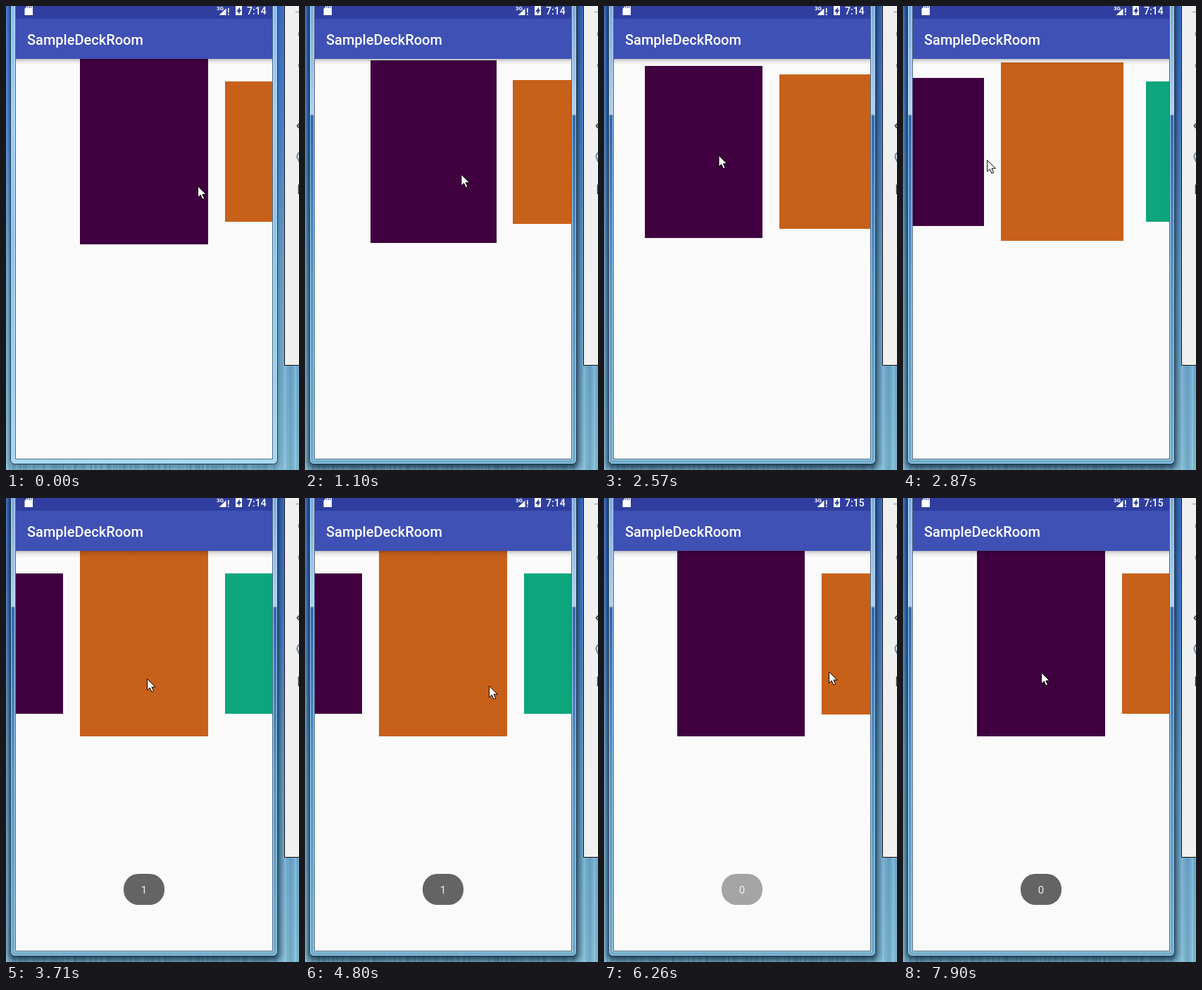
Recreate the animation shown at these times as an HTML page. Size 416 px wide and 658 px high, loop 8000 ms.

```html
<!DOCTYPE html>
<html lang="en">
<head>
<meta charset="utf-8">
<title>Card pager</title>
<style>
  html, body { margin: 0; width: 100%; height: 100%; overflow: hidden; }
  svg { display: block; width: 416px; height: 658px; }
  text { font-family: Roboto, sans-serif; fill: #fff; }
</style>
</head>
<body>
<svg viewBox="0 0 416 658">
  <defs>
    <linearGradient id="sky" x2="0" y2="1">
      <stop offset="0" stop-color="#3b6fd2"/>
      <stop offset=".25" stop-color="#4584d4"/>
      <stop offset=".55" stop-color="#67a5cf"/>
      <stop offset="1" stop-color="#82bdd6"/>
    </linearGradient>
    <linearGradient id="idleGlass" x2="0" y2="1">
      <stop offset="0" stop-color="#8db9f1"/>
      <stop offset=".25" stop-color="#a6cdf6"/>
      <stop offset=".5" stop-color="#8fc3ec"/>
      <stop offset="1" stop-color="#a6d8ee"/>
    </linearGradient>
    <linearGradient id="activeGlass" x2="0" y2="1">
      <stop offset="0" stop-color="#80a6dc"/>
      <stop offset=".248" stop-color="#b4cfec"/>
      <stop offset=".252" stop-color="#3568b0"/>
      <stop offset=".6" stop-color="#5a95c6"/>
      <stop offset="1" stop-color="#72abca"/>
    </linearGradient>
    <linearGradient id="barShade" x2="0" y2="1">
      <stop offset="0" stop-opacity=".24"/>
      <stop offset=".4" stop-opacity=".08"/>
      <stop offset="1" stop-opacity="0"/>
    </linearGradient>
    <filter id="blur" x="-10%" width="120%"><feGaussianBlur stdDeviation="5"/></filter>
    <clipPath id="screen"><path d="M14 75H378V642H14Z"/></clipPath>
  </defs>

  <rect width="416" height="658" fill="url(#sky)"/>
  <g id="streaks"></g>

  <rect id="shadow" x="4" y="-20" width="385" height="676" rx="7" fill="#04142c" filter="url(#blur)"/>
  <path d="M395.5 -1V509.5H417V-1Z" fill="#f0f0f0" stroke="#111"/>
  <g fill="none" stroke="#777" stroke-width="1.5">
    <path d="M411 8.5H416" stroke="#aaa"/>
    <path d="M415.5 37V42M415.5 82V87" stroke="#999"/>
    <path d="M416 167L413.5 170L416 173" stroke="#555" stroke-width="2"/>
    <path d="M416 208Q412 212 414 216T416 221" stroke="#6d8fa5" stroke-width="2"/>
    <path d="M415.5 253V267" stroke="#444"/>
  </g>

  <rect id="glass" x="6.5" y="-10.5" width="379" height="660" rx="6" stroke="#1c3350"/>
  <rect x="7.5" y="-9.5" width="377" height="658" rx="5" fill="none" stroke="#aeeafa" stroke-opacity=".75"/>
  <rect x="12.5" y="-5" width="367" height="648.5" fill="none" stroke="#c2ecf8" stroke-opacity=".75"/>
  <rect x="13.5" y="-5" width="365" height="647.5" fill="#fafafa" stroke="#47647f"/>

  <g id="cards" clip-path="url(#screen)"></g>
  <rect x="14" y="75" width="364" height="9" fill="url(#barShade)"/>

  <rect x="14" width="364" height="18" fill="#303f9f"/>
  <rect x="14" y="18" width="364" height="57" fill="#3f51b5"/>
  <text x="30" y="55" font-size="20" font-weight="500">SampleDeckRoom</text>
  <g fill="#fff">
    <path d="M30 0H38V13H26.5V4Z"/>
    <path d="M31 0V3M33.5 0V3M36 0V3" stroke="#303f9f"/>
    <path d="M314 2V13H302.5Z"/>
    <path d="M312.5 2H318V13H312.5Z" fill="#303f9f"/>
    <path d="M315 3H316.6V9.5H315ZM315 11H316.6V13H315Z"/>
    <path d="M326 0H335V13H326Z"/>
    <path d="M332 1.5L327 8.2H330V12L334.4 5.6H332Z" fill="#303f9f"/>
    <text x="299" y="6" font-size="8" font-weight="700">3G</text>
  </g>
  <text id="clock" x="342" y="12" font-size="14" font-weight="500"></text>

  <g id="toast">
    <rect x="167" y="533" width="58" height="44" rx="21" fill="#646464"/>
    <text id="page" x="196" y="560.5" font-size="15" text-anchor="middle" style="fill:#f0f0f0"></text>
  </g>
  <path id="cursor" d="M0 0V16L3.7 12.6L6.4 18.6L9.1 17.4L6.4 11.6H11.6Z" fill="#fff" stroke="#000" stroke-linejoin="round"/>
</svg>

<script>
const LOOP = 8000;
const TICK = 136.5;   // ms per screen refresh
const PHASE = 35.5;

const $ = id => document.getElementById(id);
const clamp = v => Math.min(1, Math.max(0, v));
const ramp = (n, from, to) => clamp((n - from) / (to - from));
const smooth = (n, from, to) => {
  const p = ramp(n, from, to);
  return p * p * (3 - 2 * p);
};

function addRect(parent, attrs) {
  const el = document.createElementNS('http://www.w3.org/2000/svg', 'rect');
  setAttrs(el, attrs);
  return parent.appendChild(el);
}

function setAttrs(el, attrs) {
  for (const name in attrs) el.setAttribute(name, attrs[name]);
}

// Faint vertical streaks on the desktop
let seed = 7;
const random = () => (seed = seed * 16807 % 2147483647) / 2147483647;
for (let x = 0; x < 416; x += 2) {
  const fill = random() < .5 ? '#fff' : '#124';
  addRect($('streaks'), { x, width: 2, height: 658, fill, opacity: random() * .14 });
}

// Pointer stops: [refresh, x, y]
const stops = [
  [1, 272.5, 255.5], [5, 257, 246], [7, 257, 246], [11, 116.5, 217.5],
  [16, 234, 224], [19, 163, 212], [22, 98, 222], [27, 200.5, 256.5],
  [38, 284.5, 270.5], [42, 348, 255], [46, 319.5, 246.5],
  [52, 292, 312], [56, 292, 312], [58, 196.5, 247.5]
];

function pointerAt(n) {
  const next = Math.max(1, stops.findIndex(stop => stop[0] >= n));
  const [from, x0, y0] = stops[next - 1], [to, x1, y1] = stops[next];
  const p = ramp(n, from, to);
  return [x0 + (x1 - x0) * p, y0 + (y1 - y0) * p];
}

// A short tug that springs back, a swipe forward, a swipe back
const scrollAt = n =>
  .151 * Math.sin(Math.PI * ramp(n, 7, 13)) +
  smooth(n, 17.06, 22.37) - smooth(n, 37.34, 46.53);

const fadeIn = (n, from) => ramp(n, from, from + 1.76);
const toastAt = n => fadeIn(n, 21) - ramp(n, 36, 38) + fadeIn(n, 45);

const cards = ['#400040', '#c7611a', '#0ca57c'].map(fill => addRect($('cards'), { fill }));

// Cards shrink away from the centre, keep a constant gap and sit on whole pixels.
function placeCard(card, offset) {
  const far = clamp(Math.abs(offset));
  const w = 182 - 50 * far, h = 263 - 64 * far;
  const left = 206 * offset + (offset < 0 ? 287 - w : 105);
  const top = 206.5 - h / 2;
  const x = Math.round(left), y = Math.round(top);
  setAttrs(card, {
    x, y,
    width: Math.round(left + w + .3) - x,
    height: Math.round(top + h + .3) - y
  });
}

function draw(now) {
  const n = Math.floor((now % LOOP + PHASE) / TICK);
  const active = n >= 7;
  const position = scrollAt(n);
  cards.forEach((card, i) => placeCard(card, i - position));
  $('cursor').setAttribute('transform', `translate(${pointerAt(n)})`);
  $('toast').setAttribute('opacity', toastAt(n));
  $('page').textContent = n < 40 ? '1' : '0';
  $('clock').textContent = n < 42 ? '7:14' : '7:15';
  $('glass').setAttribute('fill', `url(#${active ? 'active' : 'idle'}Glass)`);
  $('shadow').setAttribute('opacity', active ? .75 : .3);
}

const start = performance.now();
function tick() {
  draw(performance.now() - start);
  requestAnimationFrame(tick);
}
tick();
</script>
</body>
</html>
```
